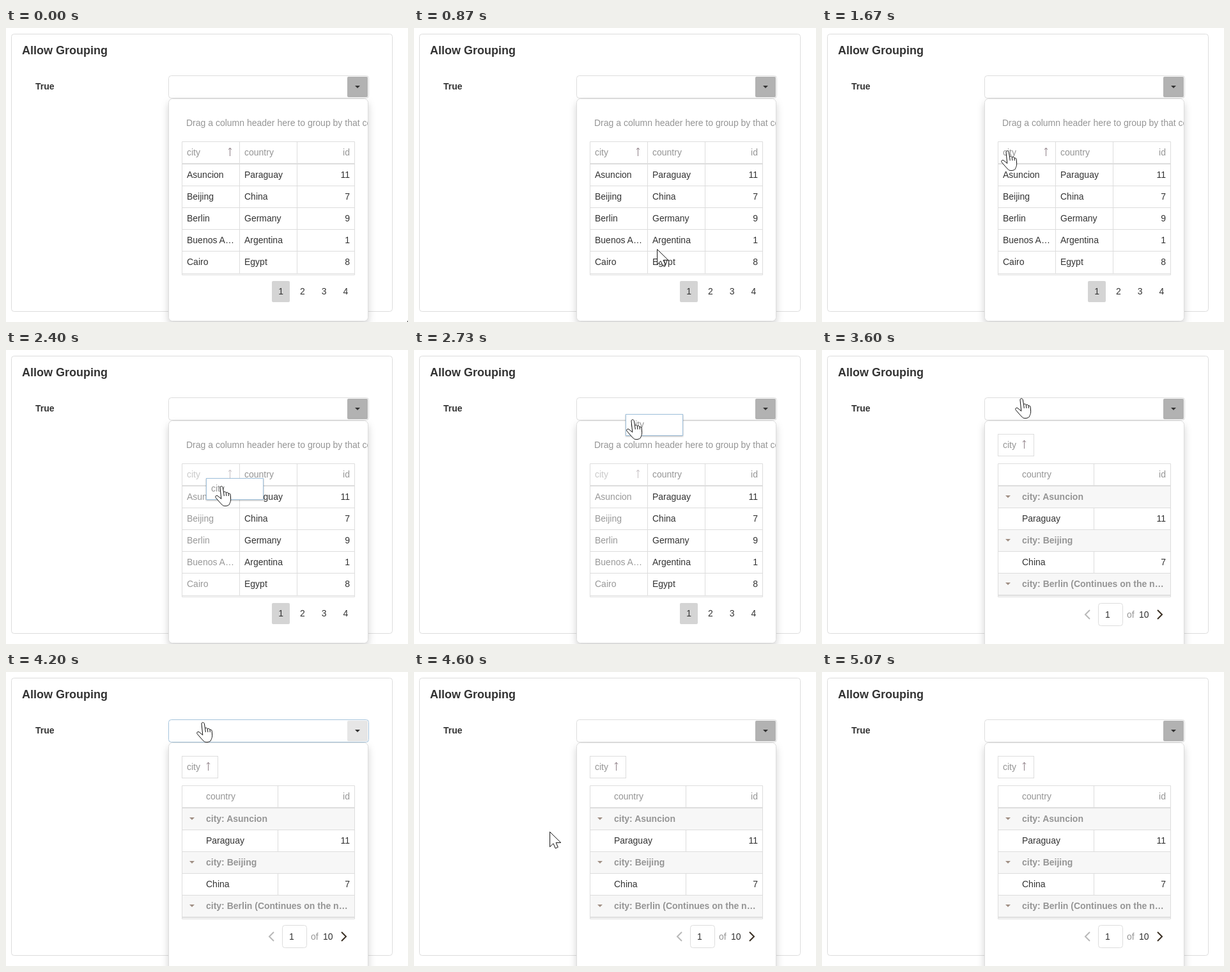
Recreate the animation shown at these times as an HTML page. Size 629x459 px, loop 5.79 s.

```html
<!DOCTYPE html>
<html lang="en">
<head>
<meta charset="utf-8">
<title>Allow Grouping</title>
<style>
html, body { margin: 0; width: 100%; height: 100%; overflow: hidden; background: #fff; }
svg { display: block; }
text { font: 14px "Liberation Sans", Arial, sans-serif; fill: #333; white-space: pre; }
.bold { font-weight: bold; }
.title { font-size: 18px; }
.soft { fill: #959595; }
.end { text-anchor: end; }
.mid { text-anchor: middle; }
.line { fill: none; stroke: #ddd; }
.box { fill: #fff; stroke: #ddd; }
#popup { filter: drop-shadow(0 6px 6px rgba(0, 0, 0, .175)); }
#drag rect { fill: #fff; stroke: #9fc1dc; filter: drop-shadow(0 1px 1px rgba(0, 0, 0, .3)); }
.sort { fill: none; stroke: #8f8088; }
.cursor { fill: #fff; stroke: #111; stroke-linejoin: round; }
</style>
</head>
<body>
<svg id="stage" width="629" height="459"></svg>
<script>
const LOOP = 5790, STEP = 1000 / 15;
const rows = [["Asuncion", "Paraguay", 11], ["Beijing", "China", 7], ["Berlin", "Germany", 9],
  ["Buenos A…", "Argentina", 1], ["Cairo", "Egypt", 8]];

const text = (x, y, s, cls = "") => `<text x="${x}" y="${y}" class="${cls}">${s}</text>`;
const box = (x, y, w, h, r = 0, id = "") =>
  `<rect id="${id}" class="box" x="${x + .5}" y="${y + .5}" width="${w}" height="${h}" rx="${r}"/>`;
const fill = (x, y, w, h, color, r = 0, id = "") =>
  `<rect id="${id}" x="${x}" y="${y}" width="${w}" height="${h}" rx="${r}" fill="${color}"/>`;
const line = d => `<path class="line" d="${d}"/>`;
const caret = (x, y, color) => `<path d="M${x - 4} ${y}h8l-4 4z" fill="${color}"/>`;
const sort = (x, y) => `<path class="sort" d="M${x + .5} ${y + 14}V${y + 1}m-2.5 3l2.5 -3l2.5 3"/>`;
const chevron = (x, dx, color) =>
  `<path d="M${x} 406l${dx} 7l${-dx} 7" fill="none" stroke="${color}" stroke-width="2"/>`;

const frame = line("M275.5 385.5V177.5H545.5V385.5Z") + fill(275, 211, 271, 2, "#ddd") +
  line([246, 280, 314, 348, 383].map(y => `M275 ${y + .5}H546`).join(""));

const flat = `<svg x="255" width="311" height="459">${
    text(27, 153, "Drag a column header here to group by that column", "soft")}</svg>` +
  frame + line("M365.5 177V383M455.5 177V383") +
  `<g id="city">${text(283, 199, "city", "soft")}${sort(350, 186)}${
    rows.map((r, i) => text(283, 234 + 34 * i, r[0])).join("")}</g>` +
  text(373, 199, "country", "soft") + text(538, 199, "id", "soft end") +
  rows.map((r, i) => text(373, 234 + 34 * i, r[1]) + text(538, 234 + 34 * i, r[2], "end")).join("") +
  fill(416, 395, 28, 33, "#d4d4d4", 2) +
  [1, 2, 3, 4].map(n => text(396.3 + 33.8 * n, 416, n, "mid")).join("");

const grouped = box(275, 131, 56, 34) + text(283, 153, "city", "soft") + sort(316, 140) +
  [213, 281, 349].map(y => fill(276, y, 269, 34, "#f7f7f7")).join("") +
  frame + line("M425.5 177V212M425.5 247V280M425.5 315V348M275 382.5H546") +
  text(313, 199, "country", "soft") + text(538, 199, "id", "soft end") +
  ["Asuncion", "Beijing", "Berlin (Continues on the n…"].map((s, i) =>
    caret(291, 227 + 68 * i, "#a08f84") + text(313, 234 + 68 * i, "city: " + s, "soft bold")).join("") +
  rows.slice(0, 2).map((r, i) =>
    text(313, 268 + 68 * i, r[1]) + text(538, 268 + 68 * i, r[2], "end")).join("") +
  chevron(419, -7, "#b9b9b9") + box(432, 395, 38, 35, 4) + text(443, 418, "1") +
  text(477, 418, "of", "soft") + text(496, 418, "10") + chevron(525, 7, "#3a3024");

const $ = id => document.getElementById(id);
$("stage").innerHTML = box(8, 9, 596, 433, 4) +
  text(25, 41, "Allow Grouping", "bold title") + text(46, 96, "True", "bold") +
  box(254, 74, 313, 35, 4, "field") + fill(534, 76, 32, 32, "#b2b2b2", 2, "button") +
  caret(550, 90, "#333") + box(254, 110, 312, 347, 6, "popup") +
  `<g id="flat">${flat}</g><g id="grouped">${grouped}</g>
  <g id="drag"><rect x=".5" y=".5" width="89" height="33"/>${text(8, 21, "city", "soft")}</g>
  <path id="arrow" class="cursor" d="M.6 .6V24L6 18.8 9.3 26.3 13.3 24.5 10.2 17.4H17.8Z"/>
  <path id="hand" class="cursor" d="M8 3C7.8 .2 11.8 0 12.3 2.6L13.6 10.5C14 8.6 17 8.8 17.3 11
    C18 9.6 20.7 10 21 12.4C22 11.4 24 12 24.2 14.2L24.6 20C24.9 25 23 27 22.4 29C21 32 13 32.4 11.4 30
    L7.6 26 1.2 18.6C-.4 16 2.8 14 5 16.4L9.8 20.4ZM13.6 10.5L14.3 16M17.3 11L17.9 16M21 12.4L21.3 16"/>`;

// Pointer hotspot: step, x, y
const path = [[0, 628, 457], [5, 485, 422], [9, 403, 395], [13, 380, 345], [14, 380, 345], [18, 342, 248],
  [21, 311, 211], [25, 289, 191], [32, 289, 191], [34, 312, 206], [35, 326, 212], [36, 336, 212],
  [38, 356, 180], [39, 359, 145], [40, 344, 112], [41, 341, 108], [43, 326, 90], [45, 311, 75],
  [62, 311, 75], [63, 307, 78], [64, 302, 88], [65, 290, 108], [66, 272, 140], [67, 252, 178],
  [71, 171, 320], [75, 74, 445], [76, 50, 480], [99, 50, 480]];

function pointer(k) {
  const i = path.findIndex(p => p[0] > k), [a, ax, ay] = path[i - 1], [b, bx, by] = path[i];
  const u = (k - a) / (b - a);
  return [Math.round(ax + (bx - ax) * u), Math.round(ay + (by - ay) * u)];
}
const show = (id, on) => $(id).style.display = on ? "" : "none";
const move = (id, x, y) => $(id).setAttribute("transform", `translate(${x} ${y})`);

function draw(now) {
  const k = Math.floor((now % LOOP + 4) / STEP);
  const [x, y] = pointer(k), [px, py] = pointer(Math.max(0, k - 1));
  const isGrouped = k >= 54, dragging = k >= 34 && !isGrouped, focused = k >= 55 && k < 66;
  const isHand = k >= 21 && k < 66;

  show("flat", !isGrouped);
  show("grouped", isGrouped);
  show("drag", dragging);
  show("hand", isHand);
  show("arrow", !isHand);
  $("city").style.opacity = dragging ? .5 : 1;
  $("field").style.stroke = focused ? "#a5c4dc" : "";
  $("button").style.fill = focused ? "#e6e6e6" : "";
  $("popup").setAttribute("height", isGrouped ? 362 : 347);
  move("drag", px - 13, py - 12);   // the dragged header trails one step behind
  move("hand", x - 9, y);
  move("arrow", x, y);
  requestAnimationFrame(tick);
}
const start = performance.now();
const tick = () => draw(performance.now() - start);
tick();
</script>
</body>
</html>
```
